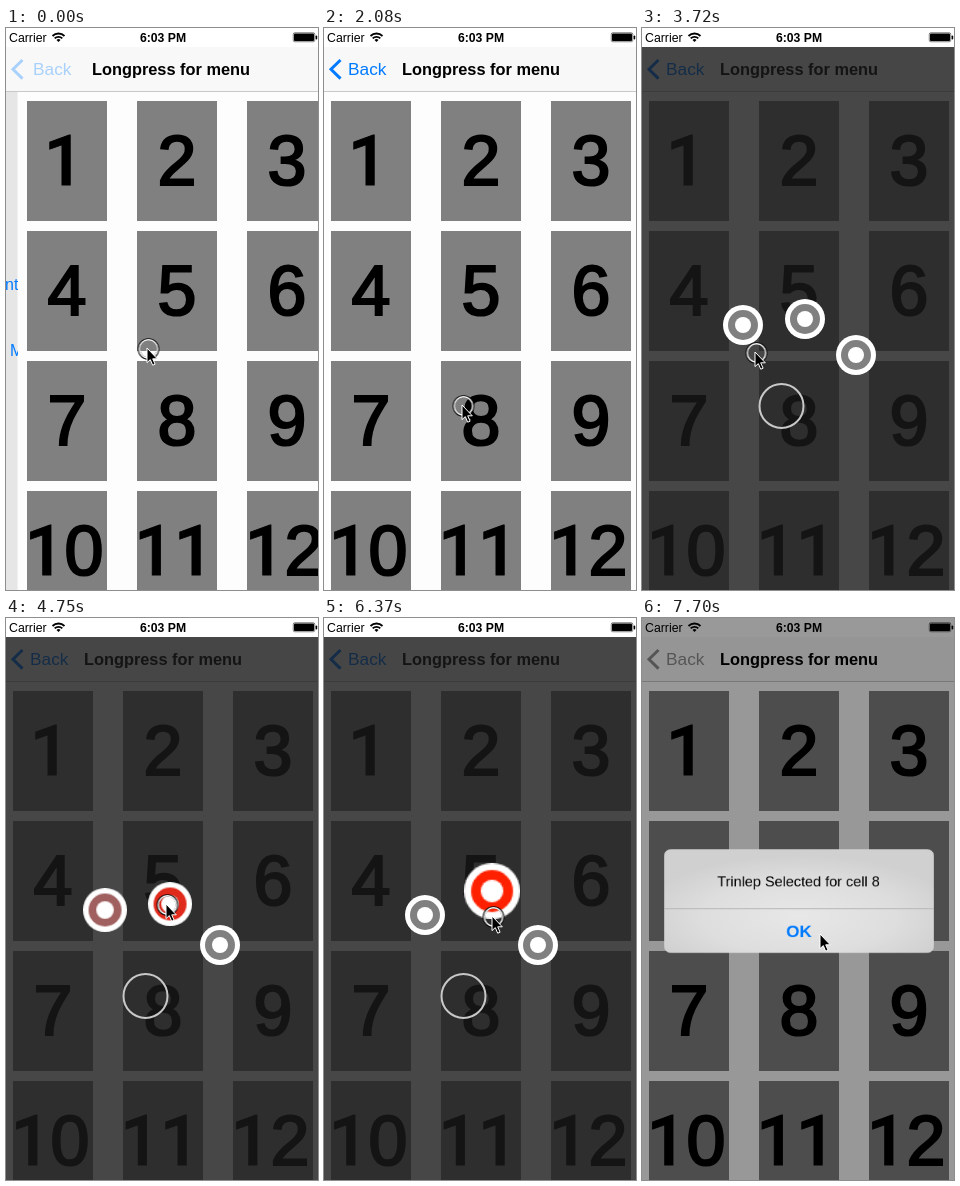
These frames come from a looping animation (312 by 562 pixels, 8000 ms). An HTML page:

```html
<!DOCTYPE html>
<html lang="en">
<head>
<meta charset="utf-8">
<title>Longpress menu</title>
<style>
html, body { margin: 0; width: 100%; height: 100%; overflow: hidden; background: #fff; }
svg { display: block; width: 312px; height: 562px; font-family: "Liberation Sans", Arial, sans-serif; }
.num { font-size: 70px; text-anchor: middle; stroke: #000; stroke-width: 2.2px; }
.num:has(.one) { transform: translateX(-3px); }
.one { font-family: Roboto, sans-serif; font-weight: 500; stroke-width: .8px; }
.bold { font-weight: bold; }
.mid { text-anchor: middle; }

.slide, .back, .prev, .menu, .fan, .item, .dim, .alert, .cursor, .press {
  animation: 8s step-end infinite;
}
.slide { animation-name: slide; }
.page { --from: 14px; }
.title { --from: 8px; }
.label { --from: 3px; }
.back { animation-name: back; }
.prev { animation-name: prev; }
.menu { animation-name: menu; }
.fan { animation-name: fan; }
.left { animation-name: left; }
.top { animation-name: top; }
.right { animation-name: right; }
.dim { animation-name: dim; }
.alert { animation-name: alert; }
.cursor { animation-name: cursor; }
.press { animation-name: press; }

/* push transition settles */
@keyframes slide { 0% { transform: translateX(var(--from)); } 1.875%, 100% { transform: none; } }
@keyframes back {
  0% { color: #a9d1fb; }
  1.875% { color: #007aff; }
  85.25%, 100% { color: #8e8e8e; }
}
@keyframes prev { 0% { opacity: 1; } 1.875%, 100% { opacity: 0; } }

/* radial menu */
@keyframes menu { 0% { opacity: 0; } 33.375% { opacity: 1; } 85.25%, 100% { opacity: 0; } }
@keyframes fan {
  0% { transform: scale(.3); }
  35.25% { transform: scale(.85); }
  37.125%, 100% { transform: none; }
}
@keyframes left {
  0%, 61.25%, 100% { transform: translate(-38.5px, -81px); color: #808080; }
  48.34%, 59.375% { transform: translate(-40.5px, -86px) scale(1.1); color: #a06060; }
  50.18% { transform: translate(-45.5px, -96px) scale(1.4); color: #ff2000; }
}
@keyframes top {
  0%, 68.61%, 100% { transform: translate(23.5px, -87px); color: #808080; }
  59.375%, 75.875% { transform: translate(24.5px, -92px) scale(1.1); color: #e02a1c; }
  66.76% { transform: translate(24.5px, -92px) scale(1.1); color: #a06060; }
  61.25%, 77.75% { transform: translate(28.5px, -105px) scale(1.4); color: #ff2000; }
}
@keyframes right {
  0%, 77.75%, 100% { transform: translate(74.5px, -51px); color: #808080; }
  66.76% { transform: translate(78.5px, -54px) scale(1.1); color: #e02a1c; }
  68.61% { transform: translate(87.5px, -60px) scale(1.4); color: #ff2000; }
  75.875% { transform: translate(78.5px, -54px) scale(1.1); color: #a06060; }
}

/* alert */
@keyframes dim {
  0% { opacity: 0; }
  85.25% { opacity: .2; }
  87.125% { opacity: .33; }
  88.875% { opacity: .38; }
  90.625%, 100% { opacity: .4; }
}
@keyframes alert {
  0% { opacity: 0; transform: scale(1.3); }
  85.25% { opacity: .5; transform: scale(1.133); }
  87.125% { opacity: .85; transform: scale(1.045); }
  88.875% { opacity: .96; transform: scale(1.01); }
  90.625%, 100% { opacity: 1; transform: none; }
}

/* pointer */
@keyframes press { 0% { opacity: 1; } 1.875% { opacity: 0; } 26% { opacity: 1; } 85.25%, 100% { opacity: 0; } }
@keyframes cursor {
  0% { transform: translate(141px, 320px); }
  1.875% { transform: translate(141px, 320px); animation-timing-function: steps(6, start); }
  12.975% { transform: translate(57px, 182px); }
  16.75% { transform: translate(57px, 182px); animation-timing-function: steps(6, start); }
  27.85% { transform: translate(138px, 377px); }
  46.5% { transform: translate(113px, 324px); }
  48.34% { transform: translate(97px, 302px); }
  50.18% { transform: translate(85px, 282px); }
  52.01% { transform: translate(77px, 266px); }
  53.86% { transform: translate(84px, 259px); }
  55.7% { transform: translate(106px, 262px); }
  57.54% { transform: translate(135px, 274px); }
  59.375% { transform: translate(160px, 286px); }
  61.25% { transform: translate(166px, 280px); }
  63.09% { transform: translate(170px, 277px); }
  64.93% { transform: translate(180px, 281px); }
  66.76% { transform: translate(193px, 290px); }
  68.61% { transform: translate(206px, 302px); }
  70.45% { transform: translate(214px, 311px); }
  72.29% { transform: translate(213px, 315px); }
  74.125% { transform: translate(205px, 311px); }
  75.875% { transform: translate(193px, 303px); }
  77.75% { transform: translate(178px, 298px); }
  79.625% { transform: translate(168px, 298px); }
  94.375% { transform: translate(174px, 309px); }
  96.25%, 100% { transform: translate(178px, 316px); }
}
</style>
</head>
<body>
<svg viewBox="0 0 312 562">
  <defs>
    <radialGradient id="glass" cx=".5" cy=".65" r=".6">
      <stop offset="0" stop-color="#e8e8e8"/>
      <stop offset=".6" stop-color="#dedede"/>
      <stop offset="1" stop-color="#d0d0d0"/>
    </radialGradient>
    <g id="disc">
      <circle r="20" fill="#fff"/>
      <circle r="15" fill="currentColor"/>
      <circle r="8" fill="#fff"/>
    </g>
  </defs>

  <rect width="312" height="562" fill="#fdfdfd"/>
  <g class="slide page" id="cells"></g>

  <g class="prev">
    <rect y="64" width="11.5" height="498" fill="#e6e6e6"/>
    <svg width="12" height="562" font-size="16" fill="#007aff">
      <text x="-1" y="262">nt</text>
      <text x="4" y="328">M</text>
    </svg>
  </g>

  <rect y="19" width="312" height="45" fill="#f8f8f8"/>
  <rect y="63" width="312" height="1" fill="#c8c8c8"/>
  <g class="back">
    <path d="M16.5 32 7 41.3 16.5 50.6" fill="none" stroke="currentColor" stroke-width="3"/>
    <text class="slide label" x="24" y="47" font-size="17.3" fill="currentColor">Back</text>
  </g>
  <text class="slide title bold" x="78" y="47" font-size="16.35">Longpress for menu</text>

  <g class="menu">
    <rect y="19" width="312" height="543" fill="#1a1a1a" opacity=".8"/>
    <g transform="translate(139.5 378)">
      <circle r="22" fill="none" stroke="#c8c8c8" stroke-width="2"/>
      <g class="fan">
        <g class="item left"><use href="#disc"/></g>
        <g class="item right"><use href="#disc"/></g>
        <g class="item top"><use href="#disc"/></g>
      </g>
    </g>
  </g>

  <rect width="312" height="19" fill="#fff"/>
  <text x="3" y="14" font-size="12.3">Carrier</text>
  <g transform="translate(52.5 14)" fill="none" stroke="#000" stroke-width="1.8">
    <path d="M-6-6A8.5 8.5 0 0 1 6-6M-3.8-3.6A5.3 5.3 0 0 1 3.8-3.6"/>
    <path d="M0 0-2-2A2.8 2.8 0 0 1 2-2Z" fill="#000" stroke="none"/>
  </g>
  <text class="mid bold" x="157" y="14" font-size="12.2">6:03 PM</text>
  <rect x="287.25" y="4.75" width="21.5" height="9" rx="1.5" fill="none" stroke="#000" stroke-width=".5"/>
  <rect x="288" y="5.5" width="20" height="7.5" rx=".8"/>
  <rect x="309.6" y="7.5" width="1.6" height="4" rx=".8"/>

  <rect class="dim" width="312" height="562"/>
  <g transform="translate(157 283)">
    <g class="alert">
      <rect x="-135" y="-52" width="270" height="104" rx="7" fill="url(#glass)"/>
      <rect x="-135" y="7" width="270" height="1" fill="#b6b6b6"/>
      <text class="mid" x="-.5" y="-15" font-size="14.45">Trinlep Selected for cell 8</text>
      <text class="mid bold" y="36" font-size="17.2" fill="#007aff">OK</text>
    </g>
  </g>

  <g class="cursor">
    <g class="press" transform="translate(1.5 1)" fill="none">
      <circle r="9.6" stroke="#000" stroke-width="2.4"/>
      <circle r="9.2" stroke="#fff" stroke-width="1.4"/>
    </g>
    <path d="M0 0V14.6L3.3 11.6 5.7 17.2 8.1 16.2 5.7 10.8H10.3Z" stroke="#fff"/>
  </g>
</svg>
<script>
const digit = d => d === '1' ? '<tspan class="one">1</tspan>' : d;

const cell = i => {
  const x = 7 + i % 3 * 110, y = 73 + Math.floor(i / 3) * 130;
  const label = [...String(i + 1)].map(digit).join('');
  return `<rect x="${x}" y="${y}" width="80" height="120" fill="#808080"/>
    <text class="num" x="${x + 40}" y="${y + 83.5}">${label}</text>`;
};

document.getElementById('cells').innerHTML = Array.from({ length: 12 }, (_, i) => cell(i)).join('');
</script>
</body>
</html>
```
